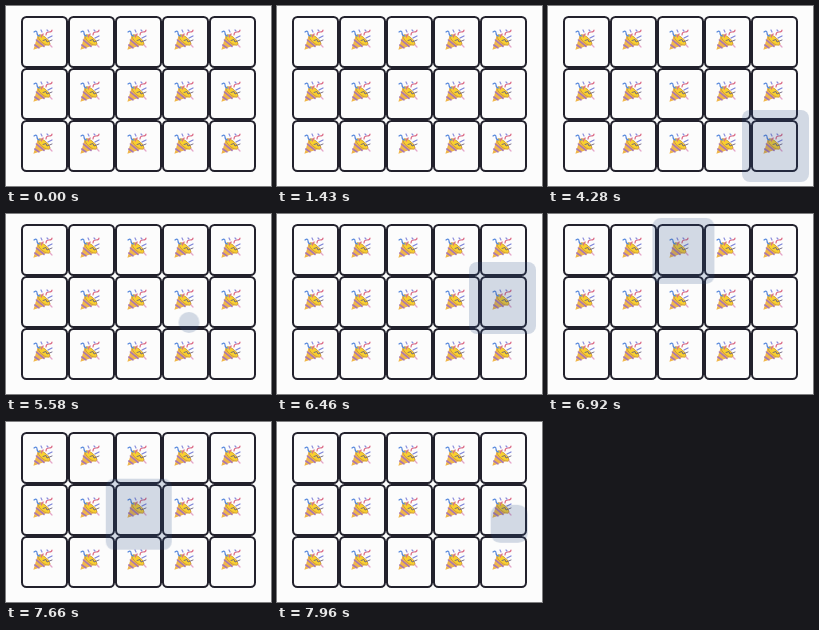
An HTML page that plays this animation: 265x180 px, repeating every 8000 ms.

```html
<!DOCTYPE html>
<html lang="en">
<head>
<meta charset="utf-8">
<title>Morphing cursor grid</title>
<style>
  html, body { margin: 0; width: 100%; height: 100%; overflow: hidden; background: #fcfcfc; }
  #stage { position: relative; width: 265px; height: 180px; overflow: hidden; }
  #cursor { position: absolute; left: 0; top: 0; background: rgba(47, 82, 137, .2); }
  svg { position: absolute; left: 0; top: 0; }
</style>
</head>
<body>
<div id="stage">
  <svg id="grid" width="265" height="180" viewBox="0 0 265 180">
    <defs>
      <g id="tile">
        <rect x="1" y="1" width="45" height="50" rx="4.5" fill="none" stroke="#22212c" stroke-width="2"/>
        <g transform="translate(12 13)" fill="none" stroke-width="1.2" stroke-linecap="round">
          <path d="M.4 20.8L4.5 7Q11 8 17.5 15Z" fill="#f0b64a"/>
          <path d="M3.4 11L11 17.4M1.8 16L6 18.8" stroke="#a775b4" stroke-width="1.6"/>
          <ellipse cx="11" cy="11" rx="7.4" ry="3" transform="rotate(40 11 11)" fill="#f9d02f" stroke="#c9963c" stroke-width=".8"/>
          <path d="M10 11.5l3-1l1 2.5l5-2" stroke="#6c6480" stroke-width=".9"/>
          <path d="M1 3q3-2 3 1t3 3" stroke="#5687dc"/>
          <path d="M8.5 8q0-3 2-3M13 6q0-3 3-3t3-2" stroke="#dc6f8a"/>
          <path d="M15 9l4-2" stroke="#7c83d9"/>
          <path d="M8 1l1 2M14 1l1 1" stroke="#8b8edc"/>
          <path d="M17 16l2 2" stroke="#e6a6c9"/>
        </g>
      </g>
    </defs>
  </svg>
  <div id="cursor"></div>
</div>
<script>
  const DURATION = 8000, COLS = 5, ROWS = 3;
  const grid = document.getElementById('grid');
  for (let i = 0; i < COLS * ROWS; i++) {
    const tile = document.createElementNS(grid.namespaceURI, 'use');
    tile.setAttribute('href', '#tile');
    tile.setAttribute('x', 15 + 47 * (i % COLS));
    tile.setAttribute('y', 10 + 52 * Math.floor(i / COLS));
    grid.append(tile);
  }

  const frames = [];
  // grow: 0 is the round pointer, 1 the padded outline of a cell
  function pose(time, x, y, grow = 0) {
    const w = 21 + 46 * grow, h = 21 + 51 * grow;
    frames.push({
      offset: time / DURATION,
      width: w + 'px',
      height: h + 'px',
      borderRadius: 10.5 - 2.5 * grow + 'px',
      transform: `translate(${x - w / 2}px, ${y - h / 2}px)`
    });
  }
  const cell = (time, col, row, dx = 0, dy = 0) =>
    pose(time, 38.5 + 47 * col + dx, 36 + 52 * row + dy, 1);
  const hold = time => frames.push({ ...frames.at(-1), offset: time / DURATION });
  const away = time => pose(time, 290, 150);

  away(0);
  hold(1380);
  pose(1380, 273.5, 141);
  hold(1430);
  away(1430);
  hold(1730);
  pose(1730, 273, 145);
  pose(2090, 261, 139);
  hold(2810);
  pose(2810, 260.5, 139);
  hold(2865);
  pose(3000, 250, 139);
  cell(3170, 4, 2, 2);
  cell(3320, 4, 2, 1);
  hold(4335);
  cell(4340, 4, 2, 2);
  pose(4480, 203, 140);
  cell(4620, 3, 2, 2);
  cell(4740, 3, 2, 1);
  hold(5460);
  pose(5580, 183, 108.5);
  hold(5630);
  cell(5700, 3, 1, 1, 1);
  hold(6000);
  pose(6085, 205, 88);
  cell(6170, 4, 1);
  hold(6350);
  cell(6460, 4, 1, -1, -4);
  hold(6510);
  pose(6550, 224, 61);

  // leftwards along the top row
  for (let col = 4; col > 0; col--) {
    const time = 6620 + 155 * (4 - col);
    cell(time, col, 0, 0, 1);
    if (col > 1) pose(time + 78, 15 + 47 * col, 37);
  }
  cell(7150, 1, 0, -4, 1);
  hold(7210);
  cell(7260, 0, 0, -2, 1);
  pose(7320, 27, 63.5);
  hold(7370);

  // back to the right, sinking towards the bottom row
  for (let col = 0; col < 4; col++) {
    const time = 7420 + 120 * col;
    cell(time, col, 1, 0, 2 + col);
    pose(time + 60, 62 + 47 * col, 100 + 5 * col);
  }
  pose(7900, 227, 135, .85);
  pose(7960, 232, 102, .34);
  hold(DURATION);

  document.getElementById('cursor').animate(frames, { duration: DURATION, iterations: Infinity });
</script>
</body>
</html>
```
